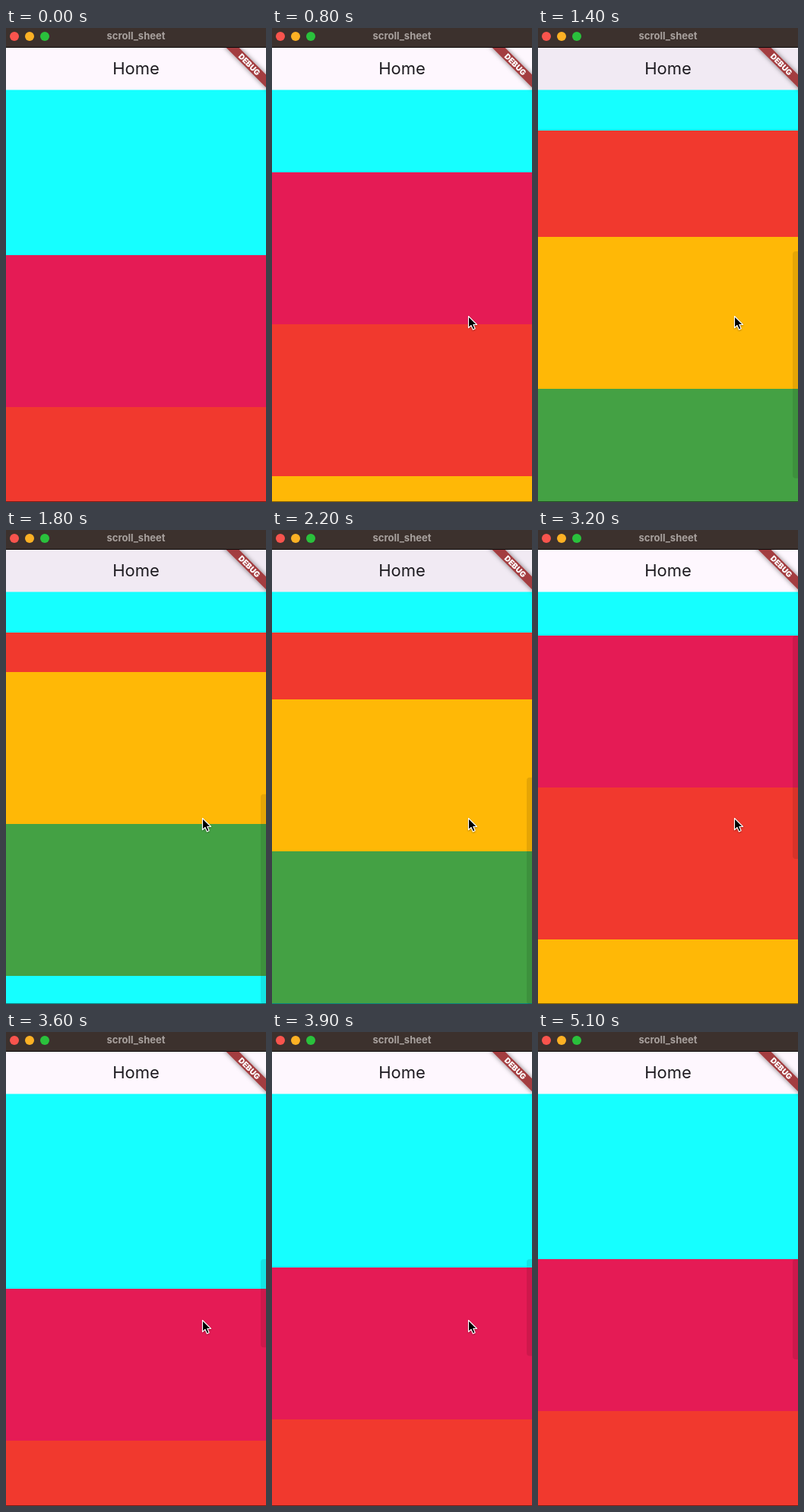
Recreate the animation shown at these times as an HTML page. Size 342 by 624 pixels, loop 5.2 s.

```html
<!DOCTYPE html>
<html lang="en">
<head>
<meta charset="utf-8">
<title>scroll_sheet</title>
<style>
  html, body { margin: 0; width: 100%; height: 100%; overflow: hidden; background: #000; }
  svg { display: block; width: 342px; height: 624px; }
  text { font-family: Inter, sans-serif; text-anchor: middle; }
</style>
</head>
<body>
<svg viewBox="0 0 342 624">
  <defs>
    <clipPath id="window"><path d="M0 26H342V624H0Z"/></clipPath>
    <clipPath id="body"><path d="M0 81H342V624H0Z"/></clipPath>
    <filter id="shade" x="-20%" y="-100%" width="140%" height="300%">
      <feDropShadow dx="0" dy="0" stdDeviation="3" flood-color="#000" flood-opacity=".5"/>
    </filter>
    <filter id="soft" x="-50%" y="-50%" width="200%" height="200%">
      <feDropShadow dx="0" dy="1" stdDeviation=".8" flood-color="#000" flood-opacity=".35"/>
    </filter>
  </defs>

  <rect y="81" width="342" height="543" fill="#15ffff"/>
  <g clip-path="url(#body)">
    <svg id="sheet" x="0" width="342" height="624">
      <g id="list"></g>
    </svg>
    <rect id="thumb" x="335" width="16" rx="4" fill="#000" fill-opacity=".1"/>
  </g>

  <rect id="bar" y="26" width="342" height="55.5"/>
  <text x="171" y="61" font-size="22" fill="#1d1b20">Home</text>

  <g clip-path="url(#window)">
    <g transform="translate(342 26) rotate(45)">
      <rect x="-44" y="25" width="88" height="12" fill="#a33c3f" filter="url(#shade)"/>
      <text y="34.7" font-size="10.2" font-weight="900" fill="#fff">DEBUG</text>
    </g>
  </g>

  <rect width="342" height="25" fill="#3c312d"/>
  <rect y="25" width="342" height="1" fill="#0c0909"/>
  <circle cx="11" cy="11" r="6" fill="#f9544d"/>
  <circle cx="31" cy="11" r="6" fill="#fdb124"/>
  <circle cx="51" cy="11" r="6" fill="#2ac13c"/>
  <text x="171" y="15.3" font-size="13" font-weight="700" fill="#a8a19e">scroll_sheet</text>
  <rect y="623" width="342" height="1" fill="#000" fill-opacity=".5"/>

  <path id="cursor" d="M0 0V15.2L3.5 12L5.9 17.5L8.6 16.3L6.3 11H11Z"
        fill="#000" stroke="#fff" stroke-width="1.1" stroke-linejoin="round" filter="url(#soft)"/>
</svg>

<script>
const LOOP = 5200, STEP = 100;
const HIGH = 135, REST = 299, BOTTOM = 624, CELL = 200;
const colors = ['#e51b55', '#f1392e', '#ffb806', '#44a144'];
const CONTENT = CELL * colors.length;
const END = BOTTOM - CONTENT;
const $ = id => document.getElementById(id);
const set = (el, attrs) => { for (const k in attrs) el.setAttribute(k, attrs[k]); };
const clamp = (v, a, b) => Math.min(b, Math.max(a, v));
const ease = u => u * u * (3 - 2 * u);

const cells = colors.map(fill => {
  const r = document.createElementNS('http://www.w3.org/2000/svg', 'rect');
  set(r, { width: 342, height: CELL, fill });
  return $('list').appendChild(r);
});

// [time, top of the list] while the fingers move
const up = [[620, REST], [800, 190], [1350, -100], [1560, -192], [1720, -229]];
const down = [[2350, END], [2700, -76], [3200, 139], [3480, 290], [3675, 350]];

function slope(keys, i) {
  const a = keys[i - 1], b = keys[i + 1];
  return a && b ? (b[1] - a[1]) / (b[0] - a[0]) : 0;
}

function curve(keys, t) {
  let i = 0;
  while (i < keys.length - 2 && t >= keys[i + 1][0]) i++;
  const [t0, y0] = keys[i], [t1, y1] = keys[i + 1];
  const d = t1 - t0, u = clamp((t - t0) / d, 0, 1), v = 1 - u;
  return y0 * v * v * (1 + 2 * u) + y1 * u * u * (3 - 2 * u)
    + d * u * v * (v * slope(keys, i) - u * slope(keys, i + 1));
}

// overdamped return from an overscroll
const spring = ms => 1.69 * Math.exp(-ms * .00908) - .69 * Math.exp(-ms * .022);

function listTop(t) {
  if (t < 1720) return curve(up, t);
  if (t < 2350) return END + (-229 - END) * spring(t - 1720);
  if (t < 3675) return curve(down, t);
  return REST + (350 - REST) * spring(t - 3675);
}

function drawThumb(t, top, sheet) {
  const view = BOTTOM - sheet;
  const over = Math.max(0, top - REST, END - top);
  const size = view * (view - over) / CONTENT;
  const part = clamp((sheet - top) / (CONTENT - view), 0, 1);
  set($('thumb'), {
    y: sheet + part * (view - size),
    height: size,
    opacity: clamp((t - 850) / 250, 0, 1)
  });
}

function drawCursor(t) {
  const come = 1 - ease(clamp((t - 350) / 150, 0, 1));
  const go = ease(clamp((t - 4300) / 400, 0, 1));
  const x = 258.5 + 92 * come + 92 * go;
  const y = 379.5 + 245 * come - 130 * go;
  set($('cursor'), { transform: `translate(${x} ${y})` });
}

function draw(t) {
  const top = Math.round(listTop(t));
  const sheet = clamp(top, HIGH, REST);
  set($('sheet'), { y: sheet, height: BOTTOM - sheet });
  cells.forEach((c, i) => set(c, { y: top - sheet + i * CELL }));
  set($('bar'), { fill: top < HIGH ? '#f1eaf3' : '#fef7fe' });
  drawThumb(t, top, sheet);
  drawCursor(t);
}

const start = performance.now();
function tick() {
  const t = (performance.now() - start) % LOOP;
  draw(Math.floor(t / STEP) * STEP);
  requestAnimationFrame(tick);
}
tick();
</script>
</body>
</html>
```
